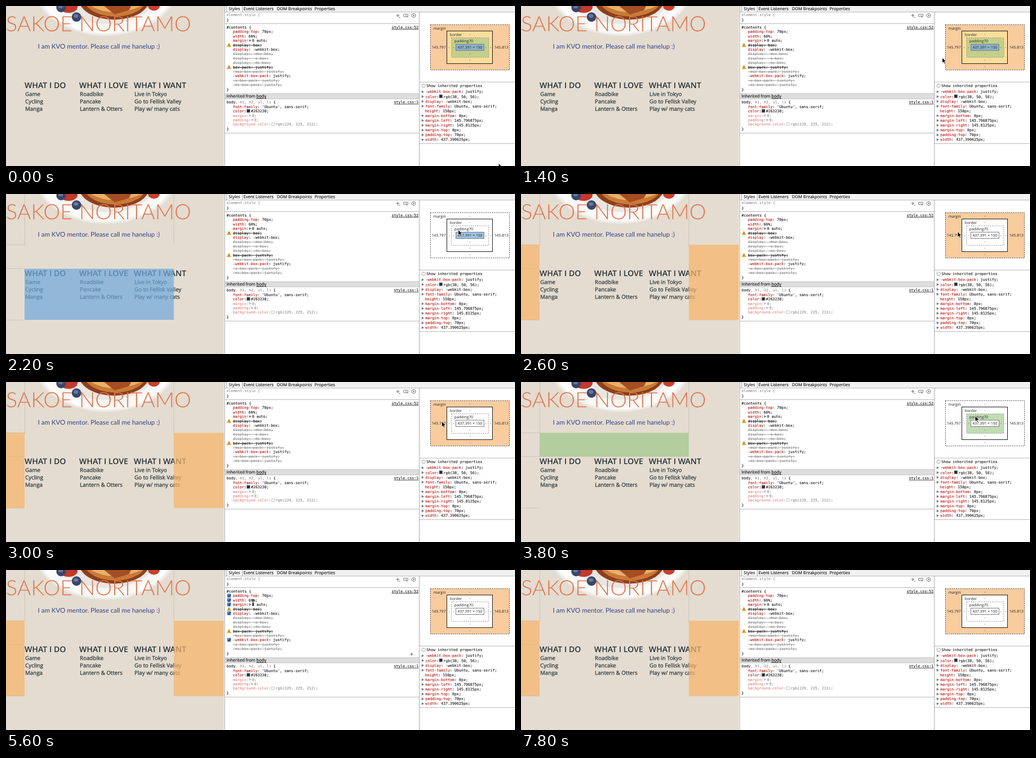
An HTML page for the animation above (8 s loop, 960 by 304 pixels).

```html
<!DOCTYPE html>
<html lang="en">
<head>
<meta charset="utf-8">
<title>Box model inspector</title>
<style>
  html, body { margin: 0; width: 100%; height: 100%; overflow: hidden; background: #fff; }
  svg { display: block; width: 960px; height: 304px; }
  text { white-space: pre; text-rendering: geometricPrecision; }
  .mono { font: 7px "DejaVu Sans Mono", monospace; fill: #1a1a1a; stroke: #1a1a1a; stroke-width: .12; }
  .ui { font: 8px "Open Sans", "Noto Sans", sans-serif; fill: #111; stroke: #111; stroke-width: .15; }
  .num { font: 7.2px "Open Sans", "Noto Sans", sans-serif; fill: #222; }
  .title { font: 300 40px Lato, sans-serif; fill: #e0744c; }
  .intro { font: 12.25px Lato, sans-serif; fill: #35408a; }
  .head { font: 600 15px "Open Sans", "Noto Sans", sans-serif; fill: #263238; }
  .item { font: 10.3px "Open Sans", "Noto Sans", sans-serif; fill: #263238; stroke: #263238; stroke-width: .25; }
  .prop { fill: #b81410; stroke: #b81410; }
  .dim { fill: #777; stroke: none; }
  .off { fill: #808080; stroke: none; text-decoration: line-through; }
  .bad { text-decoration: line-through; }
  .link { text-decoration: underline; }
</style>
</head>
<body>
<svg id="stage" viewBox="0 0 960 304" xmlns="http://www.w3.org/2000/svg"></svg>
<script>
const STEP = 200, LOOP = 8000, CHAR = 4.214;
const stage = document.getElementById('stage');

const rect = (x, y, w, h, fill, extra = '') =>
  `<rect x="${x}" y="${y}" width="${w}" height="${h}" fill="${fill}" ${extra}/>`;
const oval = (cx, cy, rx, ry, fill, extra = '') =>
  `<ellipse cx="${cx}" cy="${cy}" rx="${rx}" ry="${ry}" fill="${fill}" ${extra}/>`;
const path = (d, fill, extra = '') => `<path d="${d}" fill="${fill}" ${extra}/>`;
const text = (x, y, cls, s, extra = '') => `<text x="${x}" y="${y}" class="${cls}" ${extra}>${s}</text>`;
const group = (id, s, extra = '') => `<g id="${id}" ${extra}>${s}</g>`;
const arrow = (x, y) => path(`M${x} ${y - 2.6}l4.4 2.6l-4.4 2.6z`, '#777');

// One CSS declaration with an optional swatch or expander before its value
function decl(x, y, name, value, mark) {
  const vx = x + (name.length + 1) * CHAR;
  let s = text(x, y, 'mono', `<tspan class="prop">${name}</tspan>:`);
  if (mark === 'arrow') return s + arrow(vx + 1, y - 2.5) + text(vx + 6.5, y, 'mono', value);
  if (mark) {
    s += rect(vx + .8, y - 5.9, 6, 6, mark, 'stroke="#888" stroke-width=".6"');
    return s + text(vx + 8.7, y, 'mono', value);
  }
  return s + text(vx + CHAR, y, 'mono', value);
}

function photo() {
  const berry = (x, y, r) => oval(x, y, r, r, '#39466a') + oval(x - 1, y - 2, r * .5, r * .4, '#66779c');
  return `<defs><radialGradient id="plate"><stop offset=".72" stop-color="#f4f3f0"/>
    <stop offset=".93" stop-color="#fdfdfc"/><stop offset="1" stop-color="#e6e3dd"/></radialGradient></defs>` +
    oval(188, -45, 139, 102, 'url(#plate)') +
    oval(190, -42, 105, 76, '#e9e6e1') +
    oval(204, -12, 66, 38, '#8d3f1c') +
    oval(206, -16, 60, 36, '#c97a38') +
    path('M160 0Q202 24 256 0z', '#e6b069') +
    path('M185 0L205 16L232 8L236 0z', '#a34e24') +
    oval(118, 2, 17, 11, '#c23a2c') + oval(279, 0, 11, 9, '#c8402e') +
    berry(104, 3, 9) + berry(133, 21, 9);
}

function page() {
  const columns = [
    [35, 'WHAT I DO', 'Game', 'Cycling', 'Manga'],
    [138, 'WHAT I LOVE', 'Roadbike', 'Pancake', 'Lantern &amp; Otters'],
    [241, 'WHAT I WANT', 'Live in Tokyo', 'Go to Fellisk Valley', 'Play w/ many cats']
  ];
  let s = rect(0, 0, 411, 304, '#e4dcd0') + photo() +
    text(0, 48, 'title', 'SAKOE <tspan x="138">NORITAMO</tspan>') +
    text(60, 81, 'intro', 'I am KVO mentor. Please call me hanelup :)');
  for (const [x, head, ...items] of columns) {
    s += text(x, 156, 'head', head);
    items.forEach((item, i) => s += text(x + 1.3, 170.7 + i * 14.2, 'item', item));
  }
  return s;
}

function overlay() {
  const rulers = path('M0 96.5H35M0 141.5H35M0 239.5H35M35.5 0V97M316.5 0V97', 'none',
    'stroke="#a9a196" stroke-width=".8" stroke-dasharray="1 1"');
  const pad = 'rgba(147,196,125,.6)', mar = 'rgba(248,180,104,.7)';
  return group('rulers', rulers) +
    group('page-margin', rect(0, 96.5, 35, 143, mar) + rect(316.5, 96.5, 94.5, 143, mar)) +
    group('page-padding', rect(35, 96.5, 281.5, 45.5, pad)) +
    group('page-content', rect(35, 142, 281.5, 97, 'rgba(111,168,220,.7)'));
}

function styles() {
  const row = i => 42.9 + 8.4 * i, low = i => 185.2 + 8.45 * i;
  const gray = 'stroke="#b5b5b5" stroke-width="1"';
  let s = rect(411, 0, 549, 304, '#fff') + rect(411, 0, 549, 11, '#f1f1f1') +
    rect(416, 0, 29, 11, '#fff') +
    path('M413 11.5H960M413 33.5H779M413 241.5H779', 'none', gray) +
    path('M412.5 0V304M445.5 0V11M416.5 0V11M779.5 11V304', 'none', 'stroke="#a5a5a5"');
  [[420, 'Styles'], [448, 'Event Listeners'], [511, 'DOM Breakpoints'], [582, 'Properties']]
    .forEach(([x, label]) => s += text(x, 8, 'ui', label));

  s += text(416, 19.4, 'mono dim', 'element.style {') + text(416, 29, 'mono', '}');
  s += path('M736 18H742M739 15V21M741 21.5H743.5', 'none', 'stroke="#666" stroke-width="1.1"') +
    path('M750 15.5H758V20H750zM754 17l3 5', 'none', 'stroke="#777" stroke-width="1"') +
    `<circle cx="769" cy="18" r="3.7" fill="none" stroke="#777"/>` + path('M768 16l3 2l-3 2z', '#777');

  s += text(416, row(0), 'mono', '#contents {') +
    text(778, row(0), 'mono link', 'style.css:52', 'text-anchor="end"');
  s += decl(428, row(1), 'padding-top', '70px;') + decl(428, row(2), 'width', '60%;') +
    decl(428, row(3), 'margin', '0 auto;', 'arrow') +
    decl(428, row(5), 'display', '-webkit-box;') +
    decl(428, row(11), '-webkit-box-pack', 'justify;');
  [[6, 'display: -moz-box;'], [7, 'display: -o-box;'], [8, 'display: -ms-box;'],
   [10, '-moz-box-pack: justify;'], [12, '-o-box-pack: justify;'], [13, '-ms-box-pack: justify;']]
    .forEach(([i, line]) => s += text(428, row(i), 'mono off', line));
  [[4, 'display: box;'], [9, 'box-pack: justify;']].forEach(([i, line]) => {
    const y = row(i);
    s += text(428, y, 'mono bad', line) +
      path(`M420.5 ${y - 6}l3.8 6.8h-7.6z`, '#f2b632', 'stroke="#d08a1c" stroke-width=".6"') +
      rect(420, y - 4, 1, 2.6, '#6b4a10') + rect(420, y - .9, 1, .9, '#6b4a10');
  });
  s += text(416, row(14), 'mono', '}');

  s += rect(413, 166, 366, 11, '#dedede') + path('M413 166.5H779M413 176.5H779', 'none', 'stroke="#c4c4c4"') +
    text(416, 174.3, 'ui', 'Inherited from <tspan class="link">body</tspan>');
  s += text(416, low(0), 'mono', 'body<tspan class="dim">, h1, h2, ul, li</tspan> {') +
    text(778, low(0), 'mono link', 'style.css:1', 'text-anchor="end"') +
    decl(428, low(1), 'font-family', "'Ubuntu', sans-serif;") +
    decl(428, low(2), 'color', '#263238;', '#263238') +
    `<g opacity=".5">` + decl(428, low(3), 'margin', '0;', 'arrow') +
    decl(428, low(4), 'padding', '0;', 'arrow') +
    decl(428, low(5), 'background-color', 'rgb(229, 225, 212);', '#e5e1d4') + '</g>' +
    text(416, low(6), 'mono', '}');

  let boxes = path('M762 160H768M765 157V163', 'none', 'stroke="#666" stroke-width="1.1"');
  [1, 2, 3, 5, 11].forEach(i => {
    const y = row(i) - 5.8;
    boxes += rect(417.5, y, 6.4, 6.4, '#5f93d6', 'rx="1.2" stroke="#3c66a3" stroke-width=".8"') +
      path(`M419 ${y + 3.2}l1.6 1.8l2.8 -4.2`, 'none', 'stroke="#142540" stroke-width="1.2"');
  });
  return s + group('boxes', boxes);
}

function metrics() {
  const dash = 'stroke-dasharray="2 2"';
  const box = (id, x, y, w, h, line, extra) =>
    rect(x + .5, y + .5, w, h, '#fff', `id="${id}" stroke="${line}" ${extra}`);
  let s = box('box-margin', 800, 35, 149, 86, '#333', dash) +
    box('box-border', 831, 47, 86, 62, '#111', '') +
    box('box-padding', 840, 60, 70, 37, '#888', dash) +
    box('box-content', 848, 72, 53, 12, '#777', '');
  [[806, 44.5, 'margin'], [837, 56.5, 'border'], [845.5, 69, 'padding70'],
   [803, 81, '145.797'], [921, 81, '145.813']].forEach(([x, y, v]) => s += text(x, y, 'num', v));
  s += text(875, 81, 'num', '437.391 × 150', 'text-anchor="middle"');
  [[875, 44], [875, 56], [875, 93], [875, 105], [875, 117], [836, 81], [844, 81], [905, 81], [914, 81]]
    .forEach(([x, y]) => s += text(x, y, 'num', '-', 'text-anchor="middle"'));
  return s;
}

function computed() {
  const rows = [
    ['-webkit-box-pack', 'justify;'], ['color', 'rgb(38, 50, 56);', '#263238'],
    ['display', '-webkit-box;'], ['font-family', 'Ubuntu, sans-serif;'], ['height', '150px;'],
    ['margin-bottom', '0px;'], ['margin-left', '145.796875px;'], ['margin-right', '145.8125px;'],
    ['margin-top', '0px;'], ['padding-top', '70px;'], ['width', '437.390625px;']
  ];
  let s = path('M780 144.5H960M780 261.5H960', 'none', 'stroke="#b5b5b5"') +
    rect(784.5, 148.5, 6, 6, '#fff', 'stroke="#999" stroke-width=".9" rx="1"') +
    text(793, 153.6, 'mono', 'Show inherited properties');
  rows.forEach(([name, value, mark], i) => {
    const y = 165.4 + 9.1 * i;
    if (name !== 'height') s += arrow(784, y - 2.4);
    s += decl(name === 'height' ? 790 : 791, y, name, value, mark);
  });
  return s;
}

function cursors() {
  const pointer = path('M0 0V10.5L2.4 8.3L4 12L5.8 11.2L4.2 7.6H7.4z', '#000', 'stroke="#fff" stroke-width=".8"');
  const beam = path('M-2 -5.5Q0 -5.5 0 -4Q0 -5.5 2 -5.5M0 -4.5V4.5M-2 5.5Q0 5.5 0 4Q0 5.5 2 5.5M-1.2 1H1.2',
    'none', 'stroke="#111" stroke-width="1.2"');
  return group('pointer', pointer) + group('beam', beam);
}

stage.innerHTML = page() + overlay() + styles() + metrics() + computed() + cursors();
const el = id => document.getElementById(id);

// time, x, y of the mouse
const track = [
  [0, 929, 299], [400, 880, 222], [800, 806, 142], [1100, 791, 108], [1400, 794.5, 98],
  [1800, 836, 88], [2000, 857, 78], [2200, 853, 68], [2600, 823.5, 71.5], [3000, 822, 75],
  [3400, 850, 66], [3800, 856.5, 64.5], [4000, 856, 65], [4400, 835, 68], [4600, 820, 72],
  [4800, 800, 74], [5200, 590, 68], [5600, 466, 62], [6000, 468, 60], [6400, 500, 32],
  [6800, 530, -20], [LOOP, 530, -20]
];

// hovered area from each time on
const hovers = [
  [0, 'all'], [1600, 'margin'], [1800, 'border'], [2000, 'content'], [2400, 'padding'],
  [2600, 'margin'], [3200, 'border'], [3400, 'padding'], [4400, 'border'], [4600, 'margin']
];

const tints = { margin: '#f9cc9e', border: '#fddd9b', padding: '#c3d08b', content: '#8fb3cd' };
const solo = { ...tints, padding: '#c1dcb3', content: '#a0c6e8' };

function mouseAt(t) {
  const i = track.findIndex(k => k[0] > t);
  const [t0, x0, y0] = track[i - 1], [t1, x1, y1] = track[i];
  const p = (t - t0) / (t1 - t0);
  return [x0 + (x1 - x0) * p, y0 + (y1 - y0) * p];
}

const show = (id, on) => el(id).setAttribute('visibility', on ? 'visible' : 'hidden');

function draw(t) {
  const [x, y] = mouseAt(t);
  const area = hovers.filter(h => h[0] <= t).pop()[1];
  for (const name in tints) {
    const fill = area === 'all' ? tints[name] : area === name ? solo[name] : '#fff';
    el('box-' + name).setAttribute('fill', fill);
    if (name !== 'border') show('page-' + name, area === name);
  }
  show('rulers', area !== 'all');

  const inRule = x > 413 && x < 779 && y > 33 && y < 165;
  const onText = inRule && x < 500;
  show('boxes', inRule);
  show('pointer', !onText);
  show('beam', onText);
  for (const id of ['pointer', 'beam']) el(id).setAttribute('transform', `translate(${x} ${y})`);
}

const start = performance.now();
function tick() {
  const t = (performance.now() - start) % LOOP;
  draw(Math.floor(t / STEP) * STEP);
  requestAnimationFrame(tick);
}
tick();
</script>
</body>
</html>
```
